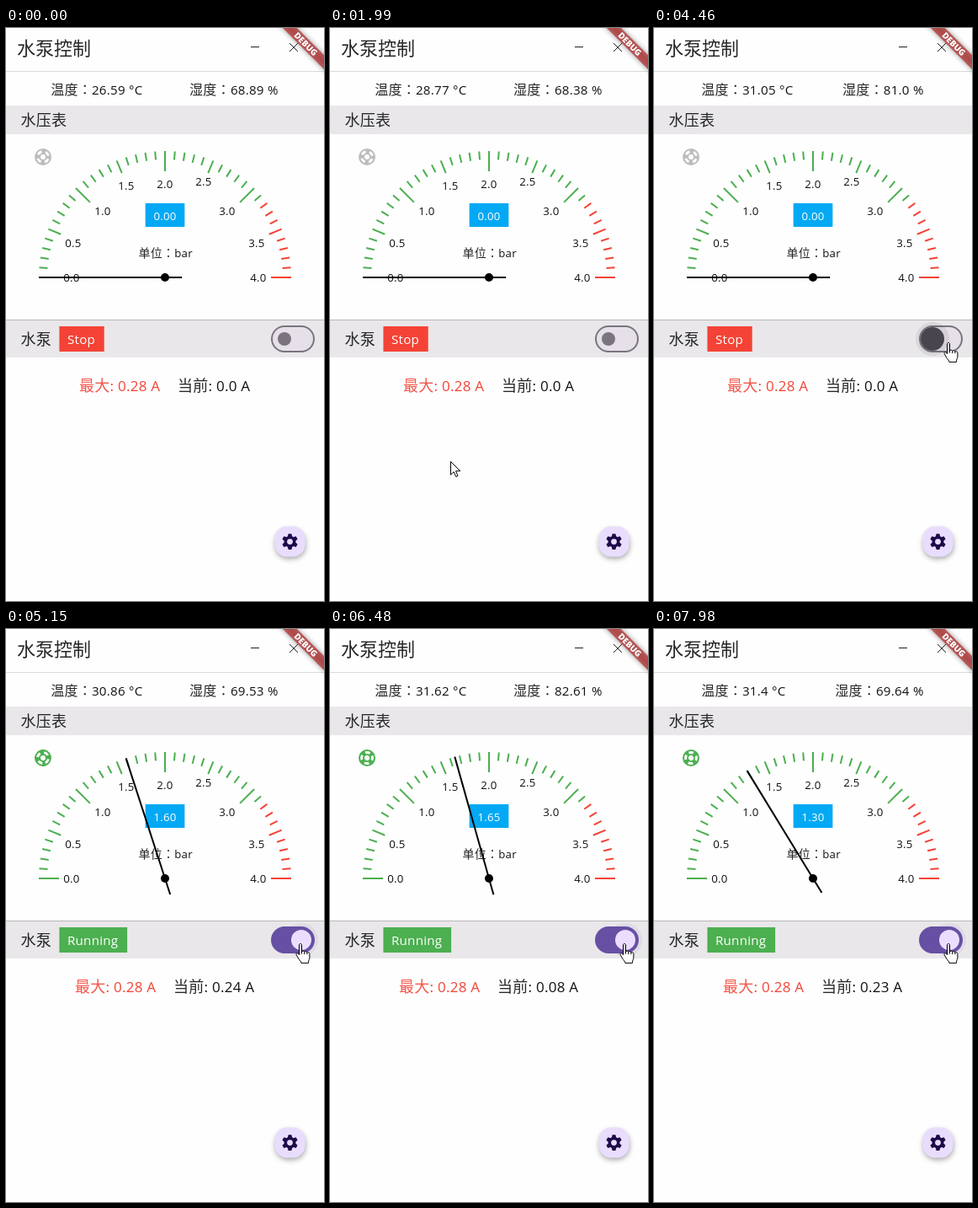
Write an HTML page that moves like this. It is 378x680 px and loops after 8000 ms.

```html
<!DOCTYPE html>
<html lang="zh-TW">
<head>
<meta charset="utf-8">
<style>
html, body { margin: 0; width: 100%; height: 100%; overflow: hidden; background: #fefefe; }
svg { display: block; width: 378px; height: 680px; }
text { font-family: "Open Sans", "Noto Sans CJK TC", "Noto Sans CJK SC", "Noto Sans CJK JP", sans-serif; letter-spacing: .25px; white-space: pre; }
.cjk { font-family: "Noto Sans CJK TC", "Noto Sans CJK SC", "Noto Sans CJK JP", sans-serif; font-weight: 300; fill-opacity: .9; }
</style>
</head>
<body>
<svg id="stage" viewBox="0 0 378 680">
  <defs>
    <filter id="blur" x="-50%" y="-80%" width="200%" height="260%"><feGaussianBlur stdDeviation="3"/></filter>
  </defs>
  <rect width="378" height="680" fill="#fefefe"/>
  <path d="M0 51.5H378" stroke="#dadada"/>
  <path d="M291 22.5H301M337 18L347 28M347 18L337 28" stroke="#222" fill="none"/>
  <rect y="92" width="378" height="34" fill="#e9e7ea"/>
  <rect y="346" width="378" height="45" fill="#e9e7ea"/>
  <path d="M0 346.5H378" stroke="#b8b7b9"/>
  <g id="labels"></g>

  <g id="wheel">
    <circle r="10"/>
    <circle r="6.5" fill="none" stroke="#fefefe" stroke-width="3" stroke-dasharray="5.445 4.765" transform="rotate(21)"/>
    <circle r="3" fill="#fefefe"/>
  </g>

  <g id="dial" stroke-width="2"></g>
  <rect x="165.65" y="208" width="46.7" height="28" fill="#03a9f4"/>
  <g id="readout"></g>
  <g id="needle"><path d="M39 296H209" stroke="#000" stroke-width="2"/></g>
  <circle cx="189" cy="296" r="5"/>

  <rect id="badge" x="63.4" y="354" height="30"/>
  <g id="live"></g>

  <rect id="track" x="316" y="354" width="50" height="30" rx="15" stroke-width="2"/>
  <circle id="halo" cy="369" r="20"/>
  <circle id="thumb" cy="369"/>

  <rect x="320" y="595" width="36" height="35" rx="15" opacity=".35" filter="url(#blur)"/>
  <rect x="319.5" y="591.5" width="36" height="36" rx="14.5" fill="#e9ddfd"/>
  <g id="gear" transform="translate(337.5 609.6) scale(.94)" fill="#1d0a48"><circle r="7.3"/></g>

  <g transform="translate(381.5 -4) rotate(45)">
    <rect x="-40" y="28" width="80" height="12" opacity=".4" filter="url(#blur)"/>
    <rect x="-40" y="28" width="80" height="12" fill="#b71c1c" fill-opacity=".63"/>
    <text x="-1.5" y="37.6" font-size="10" font-weight="800" fill="#fff" text-anchor="middle" style="letter-spacing:0">DEBUG</text>
  </g>

  <g stroke="#000" fill="#fff" stroke-linejoin="round">
    <path id="arrow" d="M.5 .5V16.2L4.2 12.7 6.7 18.5 9 17.5 6.5 11.8H11.8Z"/>
    <path id="hand" d="M-1.5 1.5c0-2 3-2 3 0v8c.5-1.5 3.2-1 3.2 .5c.5-1.3 3.2-.8 3.2 .7c.6-1 3-.5 3 1.2v4.5c0 2-1.5 3-1.5 6.5h-8.5c0-2-2-3-3-5l-2.6-4.6c-1-1.8 .8-3 2.2-1.4l1 1.3zM1.5 9.5v2.5M4.7 10v2.5M7.9 10.7v2"/>
  </g>
</svg>
<script>
const LOOP = 8000, RED = '#f44336', GREEN = '#4caf50';
const $ = id => document.getElementById(id);

function add(parent, tag, attrs) {
  const el = document.createElementNS('http://www.w3.org/2000/svg', tag);
  set(el, attrs);
  return $(parent).appendChild(el);
}
function set(el, attrs) {
  for (const key in attrs) el.setAttribute(key, attrs[key]);
}

// Latin runs are set slightly smaller than the Chinese ones.
function write(el, size, str) {
  if (el.dataset.str === str) return;
  el.dataset.str = str;
  el.innerHTML = str.replace(/[^\x00-\xff]+|[\x00-\xff]+/g, run =>
    run.charCodeAt(0) > 255
      ? `<tspan class="cjk" font-size="${size}">${run}</tspan>`
      : `<tspan font-size="${size * .945}">${run}</tspan>`);
}
function label(parent, x, y, size, str, attrs = {}) {
  const el = add(parent, 'text', { x, y, fill: '#111', ...attrs });
  write(el, size, str);
  return el;
}

label('labels', 13, 32, 22, '水泵控制', { style: 'letter-spacing:0' });
label('labels', 17.5, 115.8, 18, '水压表');
label('labels', 17.5, 375.8, 18, '水泵');
label('readout', 157.5, 272, 14, '单位：bar');
const mid = { 'text-anchor': 'middle' };
const pressure = label('readout', 189, 228, 14, '0.00', { ...mid, fill: '#fff' });
const temp = label('live', 54, 79, 16, '');
const humidity = label('live', 218, 79, 16, '');
const peak = label('live', 87, 431, 18, '最大: 0.28 A', { fill: RED });
const current = label('live', 204, 431, 18, '');
const state = label('live', 73, 375, 16, '', { fill: '#fff' });

// Dial: 0 to 4 bar over a half circle
for (let i = 0; i <= 40; i++) {
  const a = Math.PI * (1 - i / 40), c = Math.cos(a), s = Math.sin(a);
  const inner = 150 - (i % 10 ? i % 5 ? 10 : 16 : 24);
  add('dial', 'path', {
    d: `M${189 + 150 * c} ${296 - 150 * s}L${189 + inner * c} ${296 - inner * s}`,
    stroke: i > 31 ? RED : GREEN
  });
}
[[78, 296], [80, 255], [115, 217], [143, 187], [189, 185], [235, 182], [263, 217], [298, 255], [300, 296]]
  .forEach(([x, y], i) => label('dial', x, y + 4.8, 14, (i / 2).toFixed(1), { ...mid, 'stroke-width': 0 }));

for (let a = 0; a < 360; a += 60)
  add('gear', 'path', { d: 'M-3-6L-2-10H2L3-6Z', transform: `rotate(${a})` });
add('gear', 'circle', { r: 3.6, fill: '#e9ddfd' });

// Sensor samples, about two per second
const STEP = 497;
const temps = '26.59 26.91 29.6 30.12 28.77 27.35 27.92 28.46 29.8 31.05 30.86 31.24 30.57 31.62 31.18 30.93 31.4'.split(' ');
const humids = '68.89 67.52 66.4 67.18 68.38 65.74 61.02 63.57 72.3 81.0 69.53 72.18 76.35 82.61 78.42 73.26 69.64'.split(' ');
const bars = [1.6, 1.62, 1.58, 1.65, 1.52, 1.41, 1.3];
const amps = [.24, .21, .16, .08, .14, .19, .23];
const PUMP_ON = 10;

const clamp = v => Math.max(0, Math.min(1, v));
const smooth = v => v * v * (3 - 2 * v);
const ramp = (t, from, to) => smooth(clamp((t - from) / (to - from)));
const mix = (a, b, p) => a + (b - a) * p;

// Pointer path: time, x, y
const path = [[450, 285, 649], [540, 197, 596], [610, 162, 552], [720, 145, 516], [1180, 144, 514], [1330, 143, 514],
  [2390, 143, 514], [3130, 340, 371.5], [3200, 340, 371.5], [3590, 350, 373.5]];

function pointerAt(t) {
  const i = path.findIndex(p => p[0] > t);
  if (i < 0) return path[path.length - 1].slice(1);
  const a = path[Math.max(0, i - 1)], b = path[i];
  const p = t < 2390 ? clamp((t - a[0]) / (b[0] - a[0])) : ramp(t, a[0], b[0]);
  return [mix(a[1], b[1], p), mix(a[2], b[2], p)];
}

function drawPointer(t) {
  const [x, y] = pointerAt(t), hand = t >= 3000;
  for (const [id, shown] of [['arrow', t >= 450 && !hand], ['hand', hand]])
    set($(id), { transform: `translate(${x} ${y})`, visibility: shown ? 'visible' : 'hidden' });
}

function drawSwitch(t) {
  const hover = t >= 3000, p = ramp(t, 4600, 4860), on = p > .5;
  const x = mix(331, 351, p);
  const r = t < 4600 ? mix(8, 14, ramp(t, 4190, 4390)) : mix(14, 12, p);
  set($('track'), { fill: on ? '#6750a4' : '#e6e0e9', stroke: on ? '#6750a4' : '#79747e' });
  set($('thumb'), { cx: x, r, fill: on ? '#eaddff' : hover ? '#49454f' : '#79747e' });
  set($('halo'), { cx: x, fill: on ? '#6750a4' : '#1d1b20', 'fill-opacity': hover ? .08 : 0 });
}

function drawReadings(t) {
  const k = Math.floor((t + 30) / STEP), on = k >= PUMP_ON;
  const bar = on ? bars[k - PUMP_ON] : 0;

  write(temp, 16, `温度：${temps[k]} °C`);
  write(humidity, 16, `湿度：${humids[k]} %`);
  const w = temp.getComputedTextLength(), gap = (378 - w - humidity.getComputedTextLength()) / 3;
  set(temp, { x: gap - 1.2 });
  set(humidity, { x: gap * 2 + w });

  write(current, 18, `当前: ${on ? amps[k - PUMP_ON].toFixed(2) : '0.0'} A`);
  const pw = peak.getComputedTextLength(), left = (358 - pw - current.getComputedTextLength()) / 2;
  set(peak, { x: left - .6 });
  set(current, { x: left + pw + 20 });

  write(pressure, 14, bar.toFixed(2));
  set($('needle'), { transform: `rotate(${bar * 45} 189 296)` });
}

function drawPump(t) {
  const on = t >= 4855;
  set($('badge'), { width: on ? 80.7 : 53.3, fill: on ? GREEN : RED });
  write(state, 16, on ? 'Running' : 'Stop');
  set($('wheel'), {
    fill: on ? GREEN : '#bdbdbd',
    transform: `translate(44 153) rotate(${on ? (t - 4730) * .18 : 0})`
  });
}

function draw(t) {
  drawReadings(t);
  drawPump(t);
  drawSwitch(t);
  drawPointer(t);
}

function frame() {
  draw(performance.now() % LOOP);
  requestAnimationFrame(frame);
}
frame();
</script>
</body>
</html>
```
